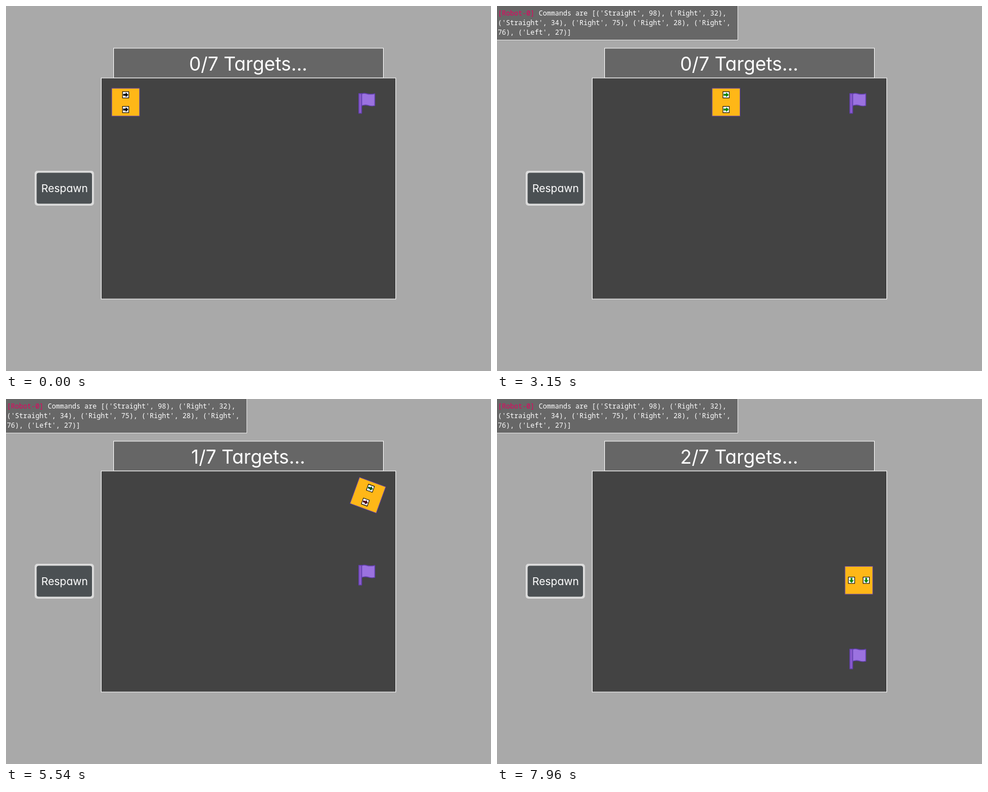
These frames come from a looping animation (863x649 px, 8 s). An HTML page:

```html
<!DOCTYPE html>
<html lang="en">
<head>
<meta charset="utf-8">
<title>Robot targets</title>
<style>
  html, body { margin: 0; width: 100%; height: 100%; overflow: hidden; background: #a9a9a9; }
  svg { display: block; width: 863px; height: 649px; }
  text { fill: #fff; font-family: Inter, "Open Sans", sans-serif; font-feature-settings: "cv11"; }
  #title, #label { text-anchor: middle; }
  #title { font-size: 33.5px; }
  #label { font-size: 19px; }
  #log text { font: 12.12px "Noto Sans Mono", "DejaVu Sans Mono", monospace; white-space: pre; }
</style>
</head>
<body>
<svg viewBox="0 0 863 649">
  <defs>
    <g id="arrow">
      <rect x="-5.6" y="-5.6" width="11.2" height="11.2" fill="#fff" stroke="#000"/>
      <path d="M-4.4 -1.6H0V-4.3L4.8 0L0 4.3V1.6H-4.4Z"/>
    </g>
  </defs>

  <g stroke="#fff">
    <rect x="191.5" y="75" width="480" height="53" fill="#666"/>
    <rect x="169.5" y="128" width="524" height="393" fill="#434343"/>
  </g>
  <text id="title" x="431" y="115"></text>

  <rect x="51" y="293" width="105.5" height="62" rx="5" fill="#dcdcdc"/>
  <rect x="54.5" y="296.5" width="98.5" height="55" rx="4" fill="#4b5053"/>
  <text id="label" x="104.3" y="331">Respawn</text>

  <g id="flag" stroke="#6340ae" stroke-width="1.4" stroke-linejoin="round">
    <path fill="#9b72e0" d="M632.5 156.3Q637 154.3 642 156T656.2 156V177.2Q651 178.8 645 176.8T632.5 177.4Z"/>
    <rect x="627.8" y="155.8" width="5" height="35" fill="#8a5ace"/>
  </g>

  <g id="robot">
    <rect x="-24.8" y="-24.8" width="49.6" height="49.6" fill="#ffb717" stroke="#6441a0"/>
    <use id="left" href="#arrow" y="-13.1"/>
    <use id="right" href="#arrow" y="13.1"/>
  </g>

  <g id="log">
    <rect x="-1" y="-1" width="429.5" height="61.5" fill="#676767" stroke="#e4e4e4"/>
    <text x="1.5" y="16.5"><tspan fill="#e6005f">[Robot-0]</tspan> Commands are [('Straight', 98), ('Right', 32),</text>
    <text x="1.5" y="33.7">('Straight', 34), ('Right', 75), ('Right', 28), ('Right',</text>
    <text x="1.5" y="50.9">76), ('Left', 27)]</text>
  </g>
</svg>
<script>
const LOOP = 8000;
const RAMP = 200;        // ms to reach full speed, and to coast to rest
const LOG_AT = 1360;
const HIT_1 = 4580, HIT_2 = 7165;
const STALL = 260;       // pause after the second hit

const green = "#008000", dimGreen = "#004a12", dimRed = "#4a0010";
const across = { start: 1460, dist: 431, speed: 0.1224, left: green, right: green };
const turn = { start: 5214, dist: 90, speed: 0.0882, left: dimGreen, right: dimRed };
const down = { start: 6365, dist: 170, speed: 0.1224, left: green, right: green };
const moves = [across, turn, down];

const el = id => document.getElementById(id);
const clamp = (v, max) => Math.min(Math.max(v, 0), max);

// Time driven at full speed when the speed grows linearly during RAMP.
const ramped = u => u < RAMP ? clamp(u, RAMP) ** 2 / (2 * RAMP) : u - RAMP / 2;
const powered = m => m.dist / m.speed;
const travel = (m, t) => m.speed * (ramped(t - m.start) - ramped(t - m.start - powered(m)));

function draw(t) {
  const clock = t - clamp(t - HIT_2, STALL);
  const x = 212.9 + travel(across, clock);
  const y = 171 + travel(down, clock);
  el("robot").setAttribute("transform", `translate(${x} ${y}) rotate(${travel(turn, clock)})`);

  const active = moves.find(m => clock >= m.start && clock < m.start + powered(m));
  for (const side of ["left", "right"])
    el(side).setAttribute("fill", active ? active[side] : "#000");

  const hits = (t >= HIT_1) + (t >= HIT_2);
  el("flag").setAttribute("transform", `translate(0 ${hits * 144.5 - (hits === 1 ? 4.5 : 0)})`);
  el("title").textContent = `${hits}/7 Targets...`;
  el("log").style.display = t < LOG_AT ? "none" : "";
}

const start = performance.now();
function tick() {
  draw((performance.now() - start) % LOOP);
  requestAnimationFrame(tick);
}
tick();
</script>
</body>
</html>
```
